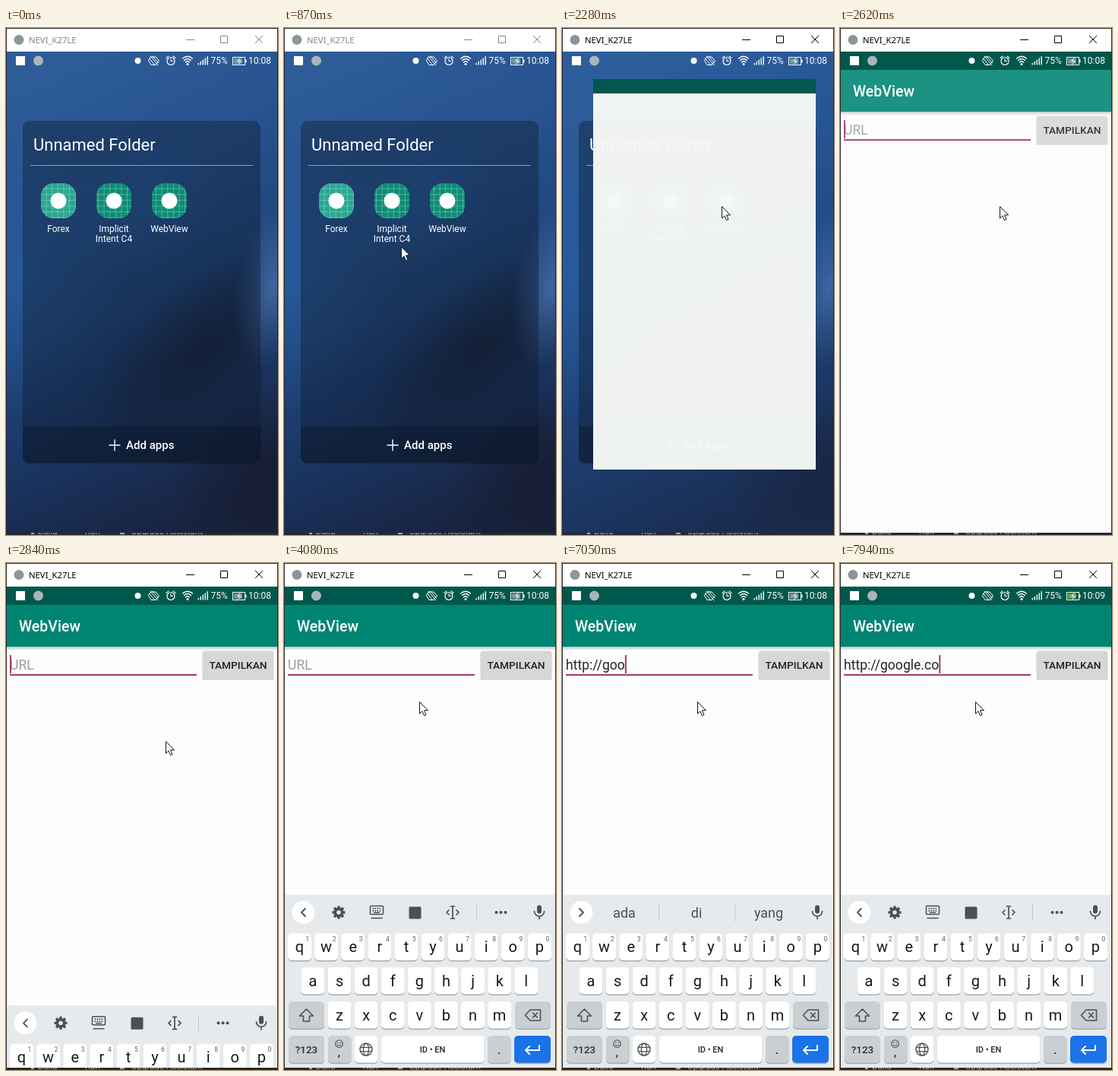
Animation of 358x666 px, one loop 8000 ms. Source, as an HTML page:

```html
<!DOCTYPE html>
<html lang="en">
<head>
<meta charset="utf-8">
<title>WebView demo</title>
<style>
html, body { margin: 0; width: 100%; height: 100%; overflow: hidden; background: #29292c; }
svg { display: block; }
text { font-family: Roboto, sans-serif; white-space: pre; }
.m { font-weight: 500; }
.c { text-anchor: middle; }
.line { fill: none; stroke-linecap: round; stroke-linejoin: round; }
</style>
</head>
<body>
<svg id="stage" width="358" height="666" viewBox="0 0 358 666"></svg>
<script>
const LOOP = 8000;
const stage = document.getElementById('stage');

// ---- markup helpers ----
const rect = (x, y, w, h, fill, more = '') =>
  `<rect x="${x}" y="${y}" width="${w}" height="${h}" fill="${fill}" ${more}/>`;
const circle = (x, y, r, fill, more = '') =>
  `<circle cx="${x}" cy="${y}" r="${r}" fill="${fill}" ${more}/>`;
const text = (x, y, size, fill, str, more = '') =>
  `<text x="${x}" y="${y}" font-size="${size}" fill="${fill}" ${more}>${str}</text>`;
const line = (d, color, w = 1, more = '') =>
  `<path class="line" d="${d}" stroke="${color}" stroke-width="${w}" ${more}/>`;
const group = (id, body, more = '') => `<g id="${id}" ${more}>${body}</g>`;
const mid = 'class="c"';

function defs() {
  const glow = (id, color, a) => `<radialGradient id="${id}">
    <stop offset="0" stop-color="${color}" stop-opacity="${a}"/>
    <stop offset="0.5" stop-color="${color}" stop-opacity="${a * 0.5}"/>
    <stop offset="1" stop-color="${color}" stop-opacity="0"/></radialGradient>`;
  return `<defs>
    <linearGradient id="sky" x1="0.35" y1="0" x2="0.6" y2="1">
      <stop offset="0" stop-color="#2d5c97"/><stop offset="0.25" stop-color="#275390"/>
      <stop offset="0.5" stop-color="#20467c"/><stop offset="0.75" stop-color="#1a3562"/>
      <stop offset="1" stop-color="#18233f"/></linearGradient>
    ${glow('blue', '#2a62a8', 0.55)}${glow('light', '#4873b2', 0.8)}${glow('dark', '#161a2e', 0.75)}
    <linearGradient id="shade" x1="0" y1="0" x2="0" y2="1">
      <stop offset="0" stop-color="#000" stop-opacity="0.22"/>
      <stop offset="1" stop-color="#000" stop-opacity="0"/></linearGradient>
    <pattern id="grid" width="7.6" height="7.6" patternUnits="userSpaceOnUse" x="46" y="204">
      <path d="M7.1 0V7.6M0 7.1H7.6" stroke="#fff" stroke-opacity="0.33" stroke-width="0.8"/></pattern>
    <clipPath id="screen"><rect x="1" y="31" width="356" height="632"/></clipPath>
    <clipPath id="below"><rect x="0" y="663" width="358" height="3"/></clipPath>
  </defs>`;
}

function desktop() {
  const labels = [[42, 'Build'], [104, 'Run'], [165, 'Upgrade Assistant']];
  return rect(0, 0, 358, 666, '#29292c') + group('desk',
    labels.map(([x, s]) => text(x, 665, 11.5, '#a5a8ab', s)).join('') +
    rect(33, 662, 4, 3, '#a5a8ab') + rect(150, 662, 6, 3, '#a5a8ab'),
    'clip-path="url(#below)"');
}

function titleBar() {
  return rect(1, 1, 356, 30, '#fff') + circle(17, 15.5, 6.5, '#8b969b') +
    text(30, 20, 11.3, 'currentColor', 'NEVI_K27LE', 'style="font-family:\'Noto Sans\',sans-serif"') +
    '<path d="M237 15.5H248M282.500 10.5H291.500V19.500H282.500ZM328 10L338 20M338 10L328 20" fill="none" stroke="currentColor"/>';
}

function wallpaper() {
  const blob = (x, y, rx, ry, id, a) =>
    `<ellipse cx="${x}" cy="${y}" rx="${rx}" ry="${ry}" fill="url(#${id})" transform="rotate(${a} ${x} ${y})"/>`;
  return rect(1, 31, 356, 632, 'url(#sky)') +
    blob(20, 330, 130, 190, 'blue', 20) + blob(180, 230, 120, 80, 'blue', -35) +
    blob(260, 420, 190, 90, 'dark', -40) + blob(345, 590, 130, 130, 'dark', 0) +
    blob(352, 340, 50, 110, 'light', 10);
}

function folder() {
  const app = (x, color, lines) => {
    const shape = 'rx="16"';
    return rect(x, 204, 46, 46, color, shape) + rect(x, 204, 46, 46, 'url(#grid)', shape) +
      circle(x + 23, 227, 10.5, '#fff') +
      lines.map((s, i) => text(x + 23, 267.500 + 13 * i, 12, '#fff', s, mid)).join('');
  };
  return rect(22, 122, 313, 450, '#0d1a2c', 'rx="9" fill-opacity="0.4"') +
    '<path d="M22 523H335V563a9 9 0 0 1-9 9H31a9 9 0 0 1-9-9Z" fill="#0a1424" fill-opacity="0.38"/>' +
    text(36, 161, 22, '#fff', 'Unnamed Folder') +
    rect(32, 180, 293, 1, '#7f9fae') +
    app(46, '#2ba793', ['Forex']) + app(119, '#0d8d76', ['Implicit', 'Intent C4']) +
    app(192, '#0d8d76', ['WebView']) +
    line('M136 548H150M143 541V555', '#fff', 1.4) +
    text(158, 553, 15, '#fff', 'Add apps', 'class="m"');
}

function statusIcons() {
  const w = '#fff';
  const bars = [0, 1, 2, 3, 4].map(i =>
    rect(252.500 + 3 * i, 46 - 2.2 * i, 1.4, 2.500 + 2.2 * i, w)).join('');
  return rect(13, 37, 12, 12, w) + circle(42.500, 43, 6.5, '#a9b5b8') +
    circle(173.500, 43, 4, w) +
    line('M191 38H197L201.500 43L197 48.500H191L187.500 43ZM190 37L200 49M188.500 40L196 49M193 37L200.500 46', w, 1) +
    circle(217, 43.500, 5, 'none', `stroke="${w}" stroke-width="1.2"`) +
    line('M217 40.500V43.500H219.500M211 39.500L214 37M223 39.500L220 37', w, 1.1) +
    line('M232.500 40Q239 34.500 245.500 40M234.500 42.500Q239 38.500 243.500 42.500M236.500 45Q239 42.500 241.500 45', w, 1.3) +
    circle(239, 47.500, 1.5, w) + bars +
    text(269.500, 47, 12, w, '75%') +
    rect(298.500, 38.500, 16, 10, 'none', `stroke="${w}"`) + rect(315, 41.500, 1.5, 4, w) +
    rect(300, 40, 11, 7, '#7b9a98', 'id="charge"') +
    line('M308 39.500L305 43.500H309L306 47.500', w, 1) +
    text(319, 47, 12, w, '10:08', 'id="clock"');
}

function appScreen() {
  return rect(1, 31, 356, 632, '#fdfdfd') +
    group('fade',
      rect(1, 110, 356, 5, 'url(#shade)') + rect(1, 55, 356, 55, '#008573') +
      text(17, 90, 19.5, '#fff', 'WebView', 'class="m"') +
      rect(5, 146, 246, 2, '#a63a63') +
      text(5, 139.500, 17.6, '#9b9f9d', 'URL', 'id="field"') +
      rect(5, 121, 2, 24, '#a63a63', 'id="caret"') +
      rect(258.500, 117, 94, 36.500, '#000', 'rx="2" fill-opacity="0.18"') +
      rect(259, 115.500, 93, 36.500, '#d6d8d6', 'rx="2"') +
      text(305.500, 139, 13.7, '#202322', 'TAMPILKAN', 'class="m c"')) +
    rect(1, 31, 356, 24, '#00574b');
}

function keyboard() {
  const ink = '#4b5054';
  const key = (x, y, w, fill = '#fff') =>
    rect(x, y + 1, w, 36, '#a9adb0', 'rx="5"') + rect(x, y, w, 35.500, fill, 'rx="5"');
  const grey = '#cacfd2';
  const row = (str, x0, y) => [...str].map((ch, i) => {
    const x = x0 + 35.1 * i;
    return key(x - 15.500, y, 31) + text(x, y + 24.500, 20, '#17191b', ch, 'class="c letter"');
  }).join('');
  const digits = [...'1234567890'].map((d, i) =>
    text(31 + 35.1 * i, 497, 8.5, '#5c6165', d, mid)).join('');

  const teeth = Array.from({ length: 8 }, (_, i) =>
    rect(70.300, 450.500, 3.4, 5, ink, `transform="rotate(${45 * i} 72 459)"`)).join('');
  const dotRow = (y, n, x0) => Array.from({ length: n }, (_, i) =>
    rect(x0 + 3 * i, y, 1.7, 1.7, ink)).join('');
  const tools = group('tools',
    line('M28 454L23 459L28 464', ink, 1.8) +
    teeth + circle(72, 459, 4.600, 'none', `stroke="${ink}" stroke-width="3.6"`) +
    rect(113.500, 450.500, 17, 11, 'none', `stroke="${ink}" stroke-width="1.5" rx="1"`) +
    dotRow(453, 4, 116.500) + dotRow(456, 4, 116.500) + rect(118, 458.600, 8, 1.4, ink) +
    line('M115 466.500H129', ink, 1.6) +
    rect(164.500, 451.500, 16, 16, ink, 'rx="1.5"') +
    line('M222 451V467M219.500 451H224.500M219.500 467H224.500M217 456L214 459L217 462M227 456L230 459L227 462', ink, 1.7) +
    rect(253, 448, 1, 22, '#c5c9cc') +
    [279.500, 285.500, 291.500].map(x => circle(x, 459, 2, ink)).join(''));
  const words = group('words',
    line('M23 454L28 459L23 464', ink, 1.8) +
    [['ada', 82], ['di', 177], ['yang', 272]].map(([s, x]) => text(x, 466, 18, ink, s, mid)).join('') +
    rect(127, 447, 1, 24, '#c5c9cc') + rect(227, 447, 1, 24, '#c5c9cc'));
  const mic = rect(333, 449.500, 6, 11, ink, 'rx="3"') +
    line('M329.500 457.500a6.500 6.500 0 0 0 13 0M336 464V467.500', ink, 1.7);

  const wide = key(6, 576, 47, grey) +
    line('M29.500 586L20.500 595H25.500V602H33.500V595H38.500Z', ink, 1.6, 'id="shift"') +
    key(304, 576, 47, grey) +
    line('M324 587H337.500V601H324L317.500 594ZM327.500 591L333.500 597M333.500 591L327.500 597', ink, 1.6);
  const bottom = key(6, 621, 47, grey) + text(29.500, 644, 13.500, '#2b2e31', '?123', 'class="m c"') +
    key(58, 621, 30.500, grey) +
    circle(72.500, 631.500, 4.800, 'none', `stroke="${ink}" stroke-width="1.1"`) +
    circle(70.800, 630.300, 0.800, ink) + circle(74.200, 630.300, 0.800, ink) +
    line('M70 633Q72.500 635.500 75 633', ink, 1) +
    text(72.500, 648, 17, '#222', ',', mid) +
    key(93, 621, 30.500) +
    circle(108, 639, 8, 'none', `stroke="${ink}" stroke-width="1.4"`) +
    `<ellipse cx="108" cy="639" rx="3.600" ry="8" fill="none" stroke="${ink}" stroke-width="1.3"/>` +
    line('M101 636.300H115M101 641.700H115', ink, 1.3) +
    key(128, 621, 135.500) + text(195.500, 643, 11, '#222', 'ID • EN', 'class="m c"') +
    key(268, 621, 30.500, grey) + text(283, 645, 18, '#222', '.', mid) +
    key(303, 621, 48, '#1a73e8') +
    line('M336 634V640H318.500M323 635L318 640L323 645', '#fff', 2);

  return rect(1, 436, 356, 227, '#e7eaec') + circle(25.500, 459, 15, '#fff') +
    tools + words + mic +
    row('qwertyuiop', 20.500, 486.500) + digits + row('asdfghjkl', 38, 531) +
    row('zxcvbnm', 73, 576) + wide + bottom;
}

stage.innerHTML = defs() + desktop() + group('title', titleBar()) +
  group('view',
    group('home', wallpaper() + rect(1, 31, 356, 632, '#2f6cba', 'id="tint" fill-opacity="0.12"') + folder()) +
    group('launch', rect(0, 0, 0, 0, '#f5f8f4', 'id="sheet"') + rect(0, 0, 0, 0, '#00574b', 'id="strip"')) +
    group('app', appScreen()) + group('keys', keyboard()) + statusIcons(),
    'clip-path="url(#screen)"') +
  group('mouse', '<path d="M0.500 0.500V16L4 12.700L6.500 18.500L9 17.400L6.500 11.700H11.500Z" fill="#fff" stroke="#111325"/>');

const el = {};
stage.querySelectorAll('[id]').forEach(n => el[n.id] = n);
const letters = [...stage.querySelectorAll('.letter')].map(n => [n, n.textContent]);

// ---- motion ----
const clamp = v => Math.min(1, Math.max(0, v));
const mix = (a, b, p) => a + (b - a) * p;
const easeOut = p => 1 - (1 - p) ** 2;
const smooth = p => p * p * (3 - 2 * p);
// progress from a to b held on n evenly timed steps
const steps = (t, a, b, n) => clamp(Math.floor((t - a) / (b - a) * (n - 1) + 1e-6) / (n - 1));
const show = (node, on) => node.setAttribute('display', on ? 'inline' : 'none');
const set = (node, attrs) => { for (const k in attrs) node.setAttribute(k, attrs[k]); };
const bend = (a, b, c, p) => mix(mix(a, b, p), mix(b, c, p), p);

const URL_TEXT = 'http://google.co';
const TYPED = [4220, 4510, 4780, 4960, 5570, 5900, 6100, 6780, 6910, 7040, 7180, 7310, 7450, 7670, 7800, 7940];

function mouseAt(t) {
  if (t < 1230) {
    const p = easeOut(steps(t, 410, 1160, 12));
    return [bend(259, 84, 184, p), bend(622, 330, 242, p)];
  }
  if (t < 2950) {
    const p = easeOut(clamp(steps(t, 1230, 1560, 6) * 5 / 6 + 1 / 6));
    return [mix(184, 210, p), mix(242, 234, p)];
  }
  if (t < 3480) {
    const p = smooth(steps(t, 2950, 3420, 8));
    return [mix(210, 267, p), mix(234, 152, p)];
  }
  const p = easeOut(steps(t, 3410, 3760, 5));
  return [mix(267, 178, p), mix(152, 182, p)];
}

function launchAt(t) {
  if (t < 2210) return 0.2;
  if (t < 2280) return 0.52;
  if (t < 2350) return 0.797;
  return t < 2420 ? 0.95 : 1;
}

function draw(t) {
  el.title.setAttribute('color', t < 2020 ? '#858789' : '#000');

  show(el.home, t < 2420);
  show(el.tint, t >= 2150);
  show(el.launch, t >= 2150 && t < 2620);
  const p = launchAt(t);
  const x = Math.round(mix(196, 1, p)), y = Math.round(mix(208, 31, p));
  const width = Math.round(mix(46, 356, p)), height = Math.round(mix(48, 632, p));
  set(el.sheet, { x, y, width, height });
  set(el.strip, { x, y, width, height: Math.round(24 * p) });
  el.launch.setAttribute('opacity', clamp(0.66 + 0.39 * p));

  show(el.app, t >= 2620);
  el.fade.setAttribute('opacity', t < 2700 ? 0.89 : 1);

  const count = TYPED.filter(at => at <= t).length;
  el.field.textContent = count ? URL_TEXT.slice(0, count) : 'URL';
  el.field.setAttribute('fill', count ? '#222524' : '#9b9f9d');
  const since = t - (count ? TYPED[count - 1] : 2580);
  show(el.caret, since % 1000 < 500);
  el.caret.setAttribute('x', count ? 5 + el.field.getComputedTextLength() : 5);

  show(el.keys, t >= 2780);
  const rise = easeOut(steps(t, 2780, 3060, 5) * 0.8 + (t >= 2780 ? 0.2 : 0));
  el.keys.setAttribute('transform', `translate(0 ${227 * (1 - rise)})`);
  const suggest = t >= 4510 && t < 7670;
  show(el.words, suggest);
  show(el.tools, !suggest);
  const upper = t >= 5370 && t < 5570;
  letters.forEach(([n, ch]) => n.textContent = upper ? ch.toUpperCase() : ch);
  el.shift.style.fill = upper ? '#4b5054' : 'none';

  el.clock.textContent = t < 7180 ? '10:08' : '10:09';
  el.charge.setAttribute('fill', t < 7670 ? '#7b9a98' : '#5fae4a');

  show(el.mouse, t >= 410);
  const [mx, my] = mouseAt(t);
  el.mouse.setAttribute('transform', `translate(${Math.round(mx)} ${Math.round(my)})`);
}

const start = performance.now();
function tick() {
  draw((performance.now() - start) % LOOP);
  requestAnimationFrame(tick);
}
tick();
</script>
</body>
</html>
```
